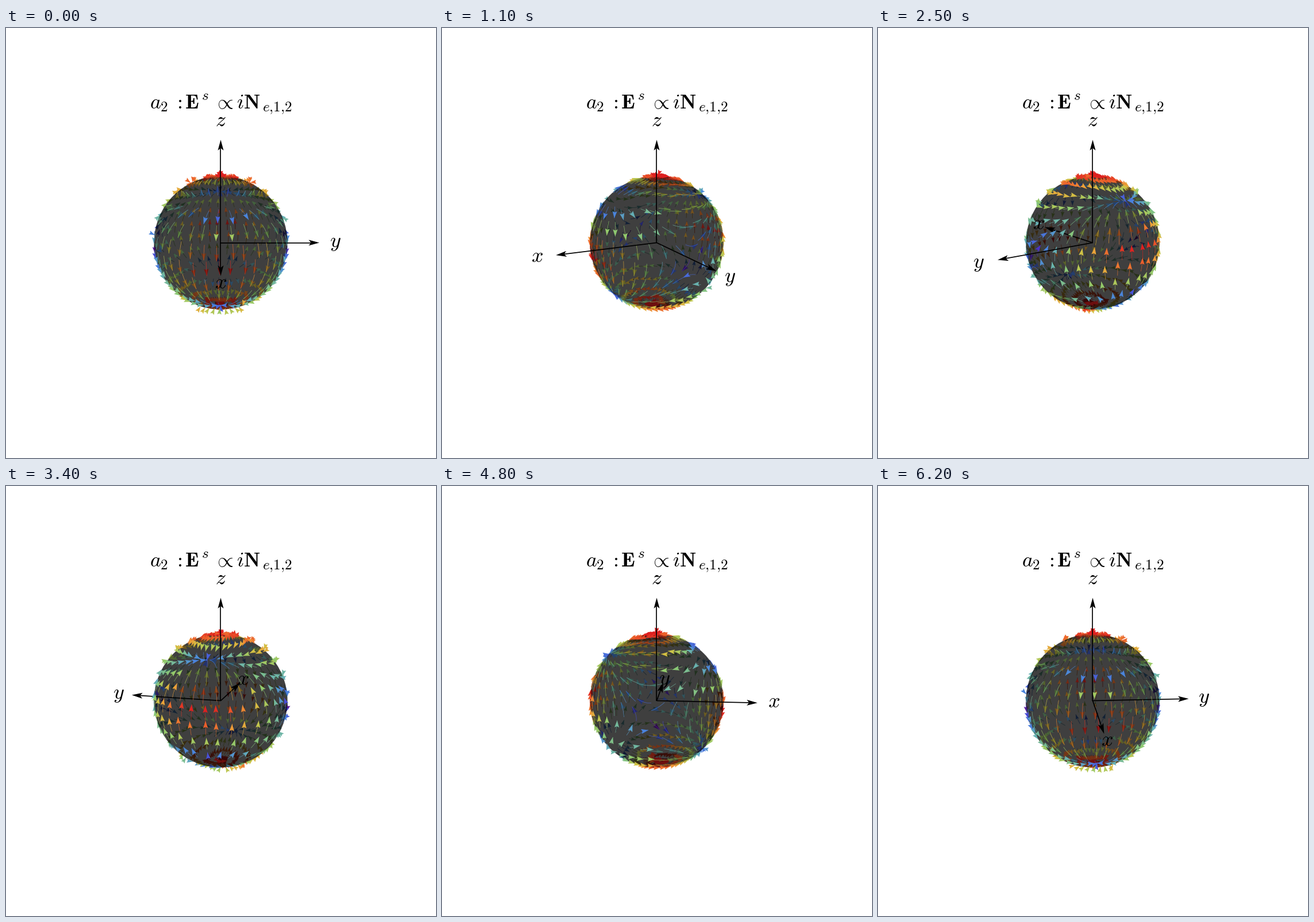
Write a matplotlib script that moves like this. It is 748 by 748 pixels and loops after 6.3 s.

```python
import numpy as np
import matplotlib.pyplot as plt
from matplotlib.animation import FuncAnimation
from matplotlib.collections import LineCollection, PolyCollection
from matplotlib.colors import LinearSegmentedColormap
from matplotlib.patches import Circle, Polygon

SIZE, DPI, FRAMES = 748, 100, 63
CENTER = 373.5
CAM_R, CAM_Z = 5.0, 1.25
CAM_D = np.hypot(CAM_R, CAM_Z)
AXIS_LEN, LABEL_LEN = 1.5, 1.74
FOCAL = 171.5 / AXIS_LEN * CAM_D
PT = 72 / DPI  # points per pixel

plt.rcParams["mathtext.fontset"] = "cm"

RAINBOW = LinearSegmentedColormap.from_list("field", [
    (0.00, "#5c1a98"), (0.14, "#463cd6"), (0.28, "#4a86dc"),
    (0.42, "#66b0b4"), (0.57, "#8fca6e"), (0.70, "#cdc546"),
    (0.82, "#eda038"), (0.92, "#ec5a2a"), (1.00, "#de2020")])


def field(theta, phi):
    """Tangential part of the even quadrupole harmonic (m=1, n=2)."""
    return -np.cos(2 * theta) * np.cos(phi), np.cos(theta) * np.sin(phi)


def on_sphere(theta, phi):
    return np.stack([np.sin(theta) * np.cos(phi),
                     np.sin(theta) * np.sin(phi),
                     np.cos(theta)], axis=-1)


def trace_streams(rows=15, cols=37, length=0.194, steps=10):
    """Short streamlines from a jittered grid, coloured by strength at the tail."""
    rng = np.random.default_rng(4)
    theta, phi = np.meshgrid(
        np.linspace(0, np.pi, rows),
        np.radians(-2) + 2 * np.pi * np.arange(cols) / cols, indexing="ij")
    theta = theta.ravel() + rng.uniform(-0.025, 0.025, theta.size)
    phi = phi.ravel() + rng.uniform(-0.025, 0.025, phi.size)
    strength = np.hypot(*field(theta, phi))
    path = [on_sphere(theta, phi)]
    for _ in range(steps):
        vt, vp = field(theta, phi)
        norm = np.hypot(vt, vp) + 1e-6
        theta = theta + vt / norm * length / steps
        phi = phi + vp / norm * length / steps
        path.append(on_sphere(theta, phi))
    return np.stack(path, axis=1), RAINBOW(np.clip(strength, 0, 1))


class Camera:
    def __init__(self, angle):
        c, s = np.cos(angle), np.sin(angle)
        self.pos = np.array([CAM_R * c, CAM_R * s, CAM_Z])
        self.view = self.pos / CAM_D
        self.right = np.array([-s, c, 0])
        self.up = np.cross(self.view, self.right)

    def scale(self, p):
        return FOCAL / (CAM_D - p @ self.view)

    def project(self, p):
        k = self.scale(p)
        return np.stack([CENTER + k * (p @ self.right),
                         CENTER - k * (p @ self.up)], axis=-1)


def heads(tip, direction, length, width, notch):
    """Notched arrowheads, one per row of tip."""
    d = direction / (np.linalg.norm(direction, axis=-1, keepdims=True) + 1e-9)
    n = np.stack([-d[:, 1], d[:, 0]], axis=-1)
    length = np.reshape(length, (-1, 1))
    half = np.reshape(width, (-1, 1)) / 2
    base = tip - d * length
    return np.stack([tip, base + n * half, tip - d * length * notch,
                     base - n * half], axis=1)


fig = plt.figure(figsize=(SIZE / DPI, SIZE / DPI), dpi=DPI, facecolor="white")
ax = fig.add_axes([0, 0, 1, 1])
ax.set_xlim(0, SIZE)
ax.set_ylim(SIZE, 0)
ax.axis("off")


def label(x, y, tex, px=36, **kw):
    return ax.text(x, y, f"${tex}$", fontsize=px * PT, color="black",
                   va="baseline", **kw)


# title, piece by piece on its baselines
for x, y, tex, px in [
        (250, 140, "a", 36), (268, 145, "2", 25.2), (291.5, 140, ":", 36),
        (311.5, 140, r"\mathbf{E}", 36), (340, 125, "s", 25.2),
        (361, 140, r"\propto", 36), (401, 140, "i", 36),
        (413.5, 140, r"\mathbf{N}", 36), (446, 145.5, "e{,}1{,}2", 25.2)]:
    label(x, y, tex, px)

# the translucent sphere: a far and a near layer
for z in (2, 4):
    ax.add_patch(Circle((CENTER, CENTER), 116, fc="black", ec="none",
                        alpha=0.5, zorder=z))

streams, colors = trace_streams()
tips = streams[:, -1]
tangents = tips - streams[:, -2]

outer, inner, front = [
    ax.add_collection(PolyCollection([], linewidths=0, zorder=z), autolim=False)
    for z in (1, 3, 5)]
back_lines, front_lines = [
    ax.add_collection(LineCollection([], linewidths=0.75 * PT, alpha=a, zorder=z),
                      autolim=False)
    for z, a in ((0.9, 1), (4.9, 0.75))]

axes3d = []
for unit, name in zip(np.eye(3), "xyz"):
    shaft, = ax.plot([], [], color="black", lw=1.7 * PT, solid_capstyle="butt")
    head = ax.add_patch(Polygon(np.zeros((4, 2)), fc="black", ec="none"))
    axes3d.append((unit, shaft, head, label(0, 0, name, ha="center", zorder=7)))


def show(coll, items, mask):
    if isinstance(coll, LineCollection):
        coll.set_segments(items[mask])
        coll.set_color(colors[mask])
    else:
        coll.set_verts(items[mask])
        coll.set_facecolor(colors[mask])


def draw(i):
    cam = Camera(0.1 * i)

    to_cam = cam.pos - tips
    near = np.sum(tips * to_cam, axis=1) > 0
    approaching = np.sum(tangents * to_cam, axis=1) > 0

    flat = cam.project(streams)
    k = cam.scale(tips)
    arrows = heads(flat[:, -1], flat[:, -1] - flat[:, -2],
                   0.09 * k, 0.06 * k, 0.84)
    # a head leans out of the surface or into it, depending on its course
    show(outer, arrows, ~near & ~approaching)
    show(inner, arrows, near ^ approaching ^ True if False else near != approaching)
    show(front, arrows, near & approaching)
    show(back_lines, flat, ~near)
    show(front_lines, flat, near)

    origin = np.array([CENTER, CENTER])
    for unit, shaft, head, text in axes3d:
        tip = cam.project(unit * AXIS_LEN)
        way = tip - origin
        end = tip - way / np.linalg.norm(way) * 14
        shaft.set_data([origin[0], end[0]], [origin[1], end[1]])
        head.set_xy(heads(tip[None], way[None], 18.5, 10, 0.78)[0])
        z = 6 if unit @ cam.view > 0 else 3.5
        shaft.set_zorder(z)
        head.set_zorder(z)
        x, y = cam.project(unit * LABEL_LEN)
        text.set_position((x, y + 7.5))
    return []


anim = FuncAnimation(fig, draw, frames=FRAMES, interval=100, repeat=True,
                     repeat_delay=0, init_func=lambda: draw(0), blit=False)
plt.show()
```
